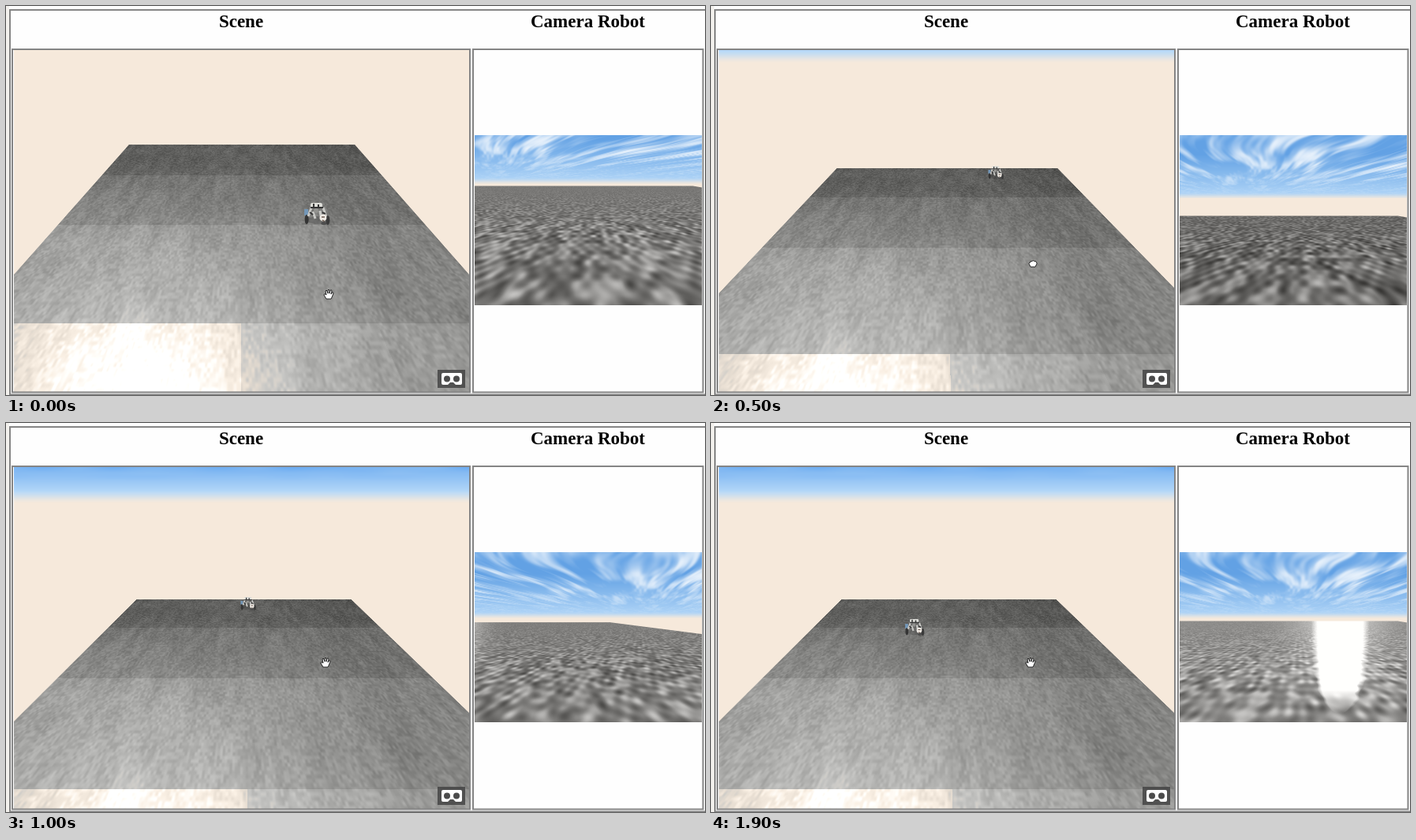
Recreate the animation shown at these times as an HTML page with a canvas. Size 886x494 px, loop 2000 ms.

```html
<!DOCTYPE html>
<html lang="en">
<head>
<meta charset="utf-8">
<title>Scene and robot camera</title>
<style>
html, body { margin: 0; width: 100%; height: 100%; overflow: hidden; background: #fefefe; }
canvas, svg { position: absolute; left: 0; top: 0; display: block; }
text { font: bold 23px "Liberation Serif", Times, serif; text-anchor: middle; }
</style>
</head>
<body>
<canvas id="views" width="886" height="494"></canvas>
<svg width="886" height="494" viewBox="0 0 886 494">
  <rect width="4" height="494" fill="#f3f1ed"/>
  <g fill="none" stroke="#858585" stroke-width="2">
    <path d="M886 5H5V494M5 493.5H886"/>
    <rect x="8" y="55" width="580" height="435.5"/>
    <rect x="592" y="55" width="291.5" height="435.5"/>
  </g>
  <text x="298" y="27">Scene</text>
  <text x="737.5" y="27">Camera Robot</text>

  <g id="robot">
    <ellipse cx="1" cy="8" rx="13" ry="5" fill="#3c3c3c" opacity=".3"/>
    <rect x="-16" y="-6" width="5" height="8" fill="#7397b8"/>
    <ellipse cx="-13" cy="7" rx="2.5" ry="6" fill="#343434"/>
    <path d="M-11 3L-7-8M8-8L12 4M-5-3L-2 6M4-4L6 7" stroke="#c9c9c6" stroke-width="3"/>
    <rect x="-8" y="-14" width="15" height="7" rx="2" fill="#deded9"/>
    <path d="M-8-8H8M-4-13V-8M2-12V-7M-9-2L-5 1M7-2L11 0" stroke="#343434" stroke-width="2"/>
    <circle cx="-1" cy="-4" r="3" fill="#92928f"/>
    <ellipse cx="14" cy="8" rx="2.5" ry="6" fill="#3a3a3a"/>
    <circle cx="8" cy="5" r="4.5" fill="#eee9e3"/>
    <path d="M6 4H10M7 8L10 10" stroke="#695a50" stroke-width="1.5"/>
    <ellipse cx="9" cy="12" rx="3.5" ry="2" fill="#4d4d4d"/>
  </g>

  <g id="cursor" fill="#fff" stroke="#222" stroke-linejoin="round">
    <path id="open" d="M-3 6L-6 1Q-6-1-4 0L-3 1L-4-4Q-3-6-2-4L-1-1L-1-5Q0-7 1-5V-1L2-5Q4-6 4-4L3 0L4-2Q6-3 6-1L4 4L3 6Z"/>
    <path id="fist" d="M-3 4L-5 0Q-5-2-3-2Q-3-4-1-3Q0-5 2-3Q4-4 4-2Q5-2 5 0L3 4Z"/>
  </g>

  <rect x="547" y="462" width="35" height="23" fill="#454545" opacity=".85"/>
  <path d="M554 466H576Q578 466 578 468V479Q578 481 576 481H570L567 478H563L560 481H554Q552 481 552 479V468Q552 466 554 466Z" fill="#fff"/>
  <g fill="#4b4b4b"><circle cx="559" cy="473.5" r="4"/><circle cx="571" cy="473.5" r="4"/></g>
</svg>
<script>
const $ = id => document.getElementById(id);
const ctx = $('views').getContext('2d');
const LOOP = 2000, STEP = 100;
const PEACH = [246, 233, 219];

const clamp = (x, a = 0, b = 1) => x < a ? a : x > b ? b : x;
const mix = (a, b, k) => a + (b - a) * k;
const ramp = (x, a, b) => clamp((x - a) / (b - a));
const smooth = (x, a, b) => { const k = ramp(x, a, b); return k * k * (3 - 2 * k); };
const blend = (a, b, k) => [mix(a[0], b[0], k), mix(a[1], b[1], k), mix(a[2], b[2], k)];

let seed = 7;
const grid = Float32Array.from({ length: 65536 }, () => (seed = seed * 16807 % 2147483647) / 2147483647);
function noise(x, y) {
  const xi = Math.floor(x), yi = Math.floor(y);
  let a = x - xi, b = y - yi;
  a *= a * (3 - 2 * a);
  b *= b * (3 - 2 * b);
  const x0 = xi & 255, x1 = xi + 1 & 255, r0 = (yi & 255) << 8, r1 = (yi + 1 & 255) << 8;
  return mix(mix(grid[r0 + x0], grid[r0 + x1], a), mix(grid[r1 + x0], grid[r1 + x1], a), b);
}

// Phases of the story, each running from 0 to 1
const phases = t => ({
  tilt: ramp(t, 0, 800),
  go: ramp(t, 0, 300),
  advance: ramp(t, 0, 500),
  turn: ramp(t, 500, 800),
  slide: ramp(t, 800, 1300),
  turn2: ramp(t, 1300, 1600),
  back: ramp(t, 1600, 1900)
});

// Fills a box pixel by pixel; row(y) returns a function of x giving a colour
function paint(x0, y0, w, h, row) {
  const img = ctx.createImageData(w, h);
  for (let y = 0, i = 0; y < h; y++) {
    const shade = row(y0 + y);
    for (let x = 0; x < w; x++, i += 4) {
      const c = shade(x0 + x);
      img.data[i] = c[0];
      img.data[i + 1] = c[1];
      img.data[i + 2] = c[2];
      img.data[i + 3] = 255;
    }
  }
  ctx.putImageData(img, x0, y0);
}

const farEdge = tilt => mix(176, 223.5, tilt);

function drawScene({ tilt }) {
  const far = farEdge(tilt), lastSeam = mix(403, 465, tilt);
  const vanish = mix(19.6, 91.6, tilt), skyEnd = mix(20, 99, tilt);
  const xl = mix(155, 165, tilt * tilt), xr = mix(442, 437, tilt);
  const yl = mix(340, 378, tilt), yr = mix(341, 368, tilt);
  const depth = y => 1 / (y - vanish);
  const unit = (depth(far) - depth(lastSeam)) / 3;

  paint(10, 56, 577, 434, y => {
    const p = (skyEnd - y) / 42;
    const sky = blend([183, 217, 248], [116, 176, 241], ramp(p, .25, 1.05));
    const air = blend(PEACH, sky, smooth(p, -.08, .36));
    if (y < far) return x => {
      if (p <= .6) return air;
      const n = (noise(x / 45, y / 7) - .5) * 22 * ramp(p, .6, 1);
      return [air[0] + n, air[1] + n * .6, air[2]];
    };
    const left = mix(xl, 10, (y - far) / (yl - far));
    const right = mix(xr, 587, (y - far) / (yr - far));
    const v = (depth(far) - depth(y)) / unit, tile = Math.floor(v);
    const base = 92 + 20 * tile + 5 * (v - tile);
    return x => {
      const cover = Math.min(clamp(x - left + .5), clamp(right - x + .5));
      if (!cover) return PEACH;
      const u = (x - left) / (right - left), d = (x - 165) / 220;
      const shine = Math.exp(-d * d);
      let g = base + shine * 6 * v * v;
      if (tile > 2) g += shine * (u < .5 ? 48 : 15);
      if (u > .75) g -= 6;
      g += (noise(u * 210, v * 40) - .5) * 26 + (noise(u * 50, v * 4) - .5) * 18;
      const warm = smooth(g, 195, 225) * ramp(g, 258, 240) * 10;
      const c = [g + warm, g, g - 2 - warm];
      return cover < 1 ? blend(PEACH, c, cover) : c;
    };
  });
}

function drawCamera({ tilt, advance, turn, slide, turn2, back }) {
  const side = turn * (1 - turn2);
  const skyEnd = mix(226, 248, 1 - (1 - tilt) ** 2);
  const edge = 228 + 38 * advance ** 1.5 - 15 * turn + 4 * (slide - turn2);
  const corner = 870 - 105 * side, drop = 2 + 13 * side;
  const origin = 610 + 75 * advance + 115 * turn - 65 * turn2;
  const shade = 119 - 14 * advance + 23 * turn - 6 * slide + 10 * turn2 + 8 * back;
  const glareX = 550 + 38 * (turn - slide) + 227 * turn2 + 20 * back;
  const glareW = 14 + 4 * side + 10 * turn2 + 8 * back;
  const glareLen = 66 + glareW * 1.6;
  const yaw = 1.2 * (turn + turn2), cos = Math.cos(yaw), sin = Math.sin(yaw);
  const travel = 14 * advance + 20 * slide + 8 * back;

  paint(594, 164, 288, 216, y => {
    const up = skyEnd + 5 - y;
    const tint = blend([178, 214, 247], [98, 161, 228], ramp(up, 8, 62));
    const toPeach = smooth(y, skyEnd - 9, skyEnd + 1);
    const dy = Math.max(1, y - skyEnd + 1);
    const z = 1400 / dy + travel;
    const fade = clamp(dy / 60, .12, 1);
    const s = (y - edge) / glareLen;
    const wide = glareW * Math.sqrt(Math.max(.01, 1 - Math.max(0, s) ** 3));

    const sky = x => {
      if (up < 6) return PEACH;
      const b = 90 / up;
      const a = (x - origin) / up + (noise(x / 60, y / 30) - .5) * .5;
      const n = noise(a * 2.4 + 20, b * 1.4 + 9) * .5 + noise(a * 5.5 + 70, b * 2.6 + 31) * .32
        + noise(a * 13 + 50, b * 5 + 5) * .18;
      const cloud = smooth(n, .32, .85) * ramp(up, 8, 48) * .9;
      return blend(blend(tint, [246, 250, 254], cloud), PEACH, toPeach);
    };
    const ground = x => {
      const a = 9.5 * (x - 738) / dy;
      const p = a * cos - z * sin + 90, q = a * sin + z * cos + 90;
      const weave = Math.sin(p * 3.1) * Math.sin(q * 3.1);
      const n = noise(p, q) - .47 + weave * .16;
      let g = shade + n * (n > 0 ? 115 : 85) * fade;
      if (s < 1) {
        const d = Math.abs(x - glareX) / glareW, halo = d / 1.7;
        g += 70 * Math.exp(-halo * halo) * (1 - s);
        g = mix(g, 255, clamp((1.15 - d * glareW / wide + n * .3 * s) * 4) * clamp((1 - s) * 4));
      }
      return [g + 1, g, g - 2];
    };
    return x => {
      const k = clamp(y - edge - drop * ramp(x, corner, 882) + .5);
      return k === 0 ? sky(x) : k === 1 ? ground(x) : blend(sky(x), ground(x), k);
    };
  });
}

function placeRobot({ tilt, go, turn, slide, turn2, back }) {
  const near = 6 + 82 * (1 - go) + 30 * back;
  const x = 394 - 33 * go - 6 * turn - 120 * slide + 4 * turn2 + 19 * back;
  const size = .57 + near * .0048;
  $('robot').setAttribute('transform', `translate(${x} ${farEdge(tilt) + near}) scale(${size})`);
}

function placeCursor({ tilt }) {
  const grab = tilt > 0 && tilt < 1;
  $('cursor').setAttribute('transform', `translate(${mix(409, 405, tilt ** 3)} ${mix(366, 304, tilt)})`);
  $('fist').style.display = grab ? '' : 'none';
  $('open').style.display = grab ? 'none' : '';
}

function draw(t) {
  const now = phases(t);
  drawScene(now);
  drawCamera(now);
  placeRobot(now);
  placeCursor(now);
}

const start = performance.now();
let shown = -1;
function tick() {
  const t = Math.floor((performance.now() - start) % LOOP / STEP) * STEP;
  if (t !== shown) draw(shown = t);
  requestAnimationFrame(tick);
}
tick();
</script>
</body>
</html>
```
